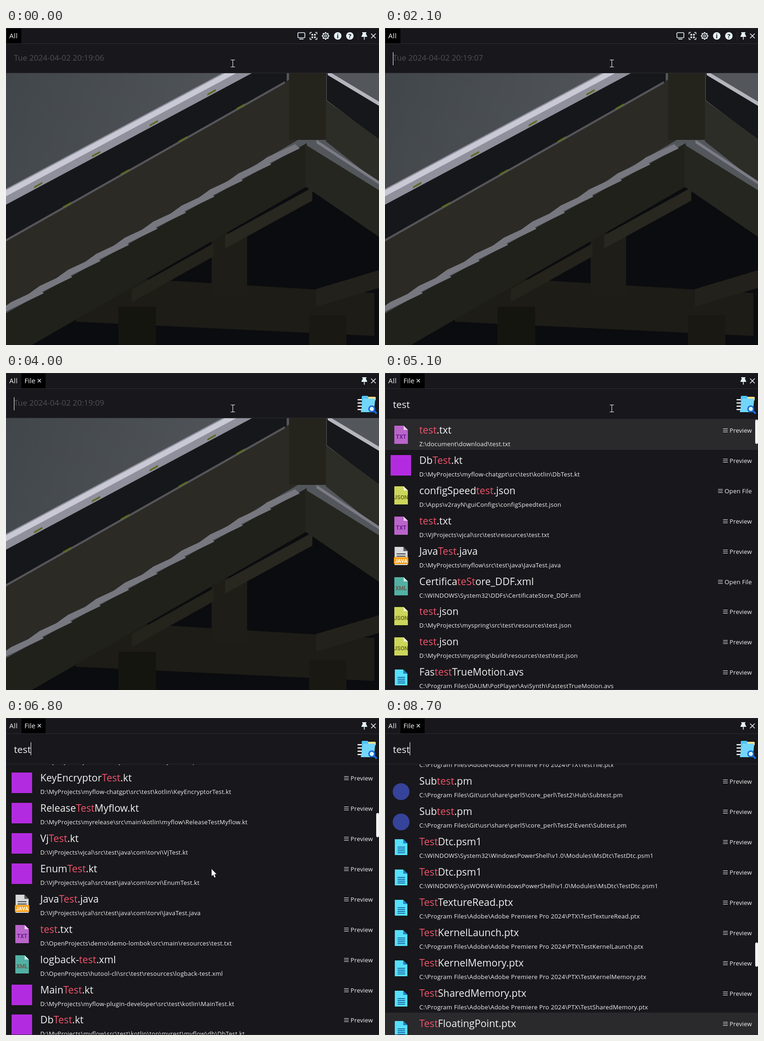
An HTML page with a canvas for the animation above (9000 ms loop, 800x680 px).

```html
<!DOCTYPE html>
<html lang="en">
<head>
<meta charset="utf-8">
<title>Launcher search</title>
<style>
html, body { margin: 0; width: 100%; height: 100%; overflow: hidden; background: #000; }
canvas { display: block; }
</style>
</head>
<body>
<canvas id="stage" width="800" height="680"></canvas>
<script>
const c = document.getElementById('stage').getContext('2d');
const LOOP = 9000, STEP = 100, BLINK = 500, PITCH = 64.9, TOP = 99;
const BG = '#18171b', EDGE = '#2d2c30', ROW = '#2a292c', INK = '#f2f2f3', HIT = '#f0546c', TOOL = '#e6f3fa';
const SANS = '"Open Sans", "Noto Sans", sans-serif', LABEL = 'Roboto, sans-serif';

// ---- drawing helpers ----
function poly(color, ...pts) {
  c.beginPath();
  for (let i = 0; i < pts.length; i += 2) c.lineTo(pts[i], pts[i + 1]);
  c.fillStyle = color;
  c.fill();
}
function line(width, x0, y0, x1, y1, color = TOOL) {
  c.beginPath(); c.moveTo(x0, y0); c.lineTo(x1, y1);
  c.strokeStyle = color; c.lineWidth = width; c.stroke();
}
function rect(color, x, y, w, h, r = 0) {
  c.beginPath(); c.roundRect(x, y, w, h, r); c.fillStyle = color; c.fill();
}
function disc(color, x, y, r) {
  c.beginPath(); c.arc(x, y, r, 0, 7); c.fillStyle = color; c.fill();
}
function ring(color, width, x, y, r) {
  c.beginPath(); c.arc(x, y, r, 0, 7); c.strokeStyle = color; c.lineWidth = width; c.stroke();
}
function cross(x, y, r, width) {
  line(width, x - r, y - r, x + r, y + r);
  line(width, x - r, y + r, x + r, y - r);
}
function text(s, x, y, size, color = INK, { gap = 0, align = 'left', font = SANS, weight = 400 } = {}) {
  c.font = `${weight} ${size}px ${font}`;
  c.letterSpacing = gap + 'px';
  c.textAlign = align;
  c.fillStyle = color;
  c.fillText(s, x, y);
  return c.measureText(s).width;
}
const progress = (t, from, to) => Math.min(1, Math.max(0, (t - from) / (to - from)));

// ---- result lists: "folder > title", matches between bars ----
const API = String.raw`D:\VjProjects\vjcal\src\test\java\com\torvi`;
const PTX = String.raw`C:\Program Files\Adobe\Adobe Premiere Pro 2024\PTX`;
const files = [];
function addFiles(start, list) {
  list.trim().split('\n').forEach((s, i) => {
    const [dir, title] = s.split(' > ');
    const name = title.replaceAll('|', '');
    files[start + i] = {
      title, sub: dir + '\\' + name, icon: name.split('.').pop(),
      tag: /config|Certif/.test(name) ? 'Open File' : 'Preview'
    };
  });
}
'Login Cache Token Media Search Price Image Video Label Upload Report Refund Audit Batch Filter'.split(' ')
  .forEach((word, i) => {
    addFiles(9 + i, `${API}\\vjstudio\\api > ${word}|Test|.kt`);
    addFiles(27 + i, `${API}\\vjmusic\\api > Pc${word}|Test|.kt`);
    addFiles(50 + i, `${PTX} > |Test|${word}.ptx`);
  });
addFiles(0, String.raw`
Z:\document\download > |test|.txt
D:\MyProjects\myflow-chatgpt\src\test\kotlin > Db|Test|.kt
D:\Apps\v2rayN\guiConfigs > configSpeed|test|.json
D:\VjProjects\vjcal\src\test\resources > |test|.txt
D:\MyProjects\myflow\src\test\java > Java|Test|.java
C:\WINDOWS\System32\DDFs > Certifica|teSt|ore_DDF.xml
D:\MyProjects\myspring\src\test\resources > |test|.json
D:\MyProjects\myspring\build\resources\test > |test|.json
C:\Program Files\DAUM\PotPlayer\AviSynth > Fas|test|TrueMotion.avs`);
addFiles(18, String.raw`
D:\MyProjects\myflow-chatgpt\src\test\kotlin > KeyEncryptor|Test|.kt
D:\MyProjects\myrelease\src\main\kotlin\myflow > Release|Test|Myflow.kt
${API} > Vj|Test|.kt
${API} > Enum|Test|.kt
${API} > Java|Test|.java
D:\OpenProjects\demo\demo-lombok\src\main\resources > |test|.txt
D:\OpenProjects\hutool-cli\src\test\resources > logback-|test|.xml
D:\MyProjects\myflow-plugin-developer\src\test\kotlin > Main|Test|.kt
D:\MyProjects\myflow\src\test\kotlin\top\myrest\myflow\db > Db|Test|.kt`);
addFiles(40, String.raw`
${API}\vjstudio\api > PcPay|Test|.kt
${API}\vjdrmc\api > ApiZebra|Test|.kt
${API}\vjmusic\api > ApiAuth|Test|.kt
${API}\vjstudio\api > PcCase|Test|.kt
${API}\vjstudio\api > PcIpos|Test|.kt
${API}\vjstudio\api > PcUser|Test|.kt
D:\VjProjects\vjmq\src\test\java\com\torvi\vjmq\test > RocketMq|Test|.java
${API}\vjmusic\api > ApiMusic|Test|.kt
${API}\vjstudio\api > PcOrder|Test|.kt
${API}\vjstudio\api > PcMobile|Test|.kt`);
addFiles(65, String.raw`
${PTX} > |Test|Tile.ptx
C:\Program Files\Git\usr\share\perl5\core_perl\Test2\Hub > Sub|test|.pm
C:\Program Files\Git\usr\share\perl5\core_perl\Test2\Event > Sub|test|.pm
C:\WINDOWS\System32\WindowsPowerShell\v1.0\Modules\MsDtc > |Test|Dtc.psm1
C:\WINDOWS\SysWOW64\WindowsPowerShell\v1.0\Modules\MsDtc > |Test|Dtc.psm1
${PTX} > |Test|TextureRead.ptx
${PTX} > |Test|KernelLaunch.ptx
${PTX} > |Test|KernelMemory.ptx
${PTX} > |Test|SharedMemory.ptx
${PTX} > |Test|FloatingPoint.ptx`);

const pins = [
  { icon: 'pinyin', title: '|p|inyin', sub: 'pinyin' },
  { icon: 'office', title: 'K|P|Z Office', sub: String.raw`C:\Users\kelno\Desktop\WPS Office.lnk`, tag: 'Open File' },
  { icon: 'image', title: '|p|df2image', sub: 'PDF To Image' },
  { icon: 'history', title: '|p|lugin set', sub: 'From History', tag: 'Pick' },
  { icon: 'bot', title: '|p|in', sub: 'Pin Keyword //', tag: 'Default Operation' }
];

// ---- icons, relative to the top of a row and centred on MID ----
const MID = 34.5;
function sheet(color, fold, w, h, y, corner = 9) {
  const x = MID - w / 2, r = x + w;
  poly(color, x, y, r - corner, y, r, y + corner, r, y + h, x, y + h);
  poly(fold, r - corner, y, r, y + corner, r - corner, y + corner);
}
function stamp(s, y, size, color, font = LABEL) {
  text(s, MID, y, size, color, { align: 'center', weight: 700, font });
}
function labelled(color, fold, label, ink) {
  sheet(color, fold, 29, 39, 14);
  stamp(label, 42, 12, ink);
}
function stripes(color, x, y, w, h, gap, count) {
  for (let i = 0; i < count; i++) rect(color, x, y + i * gap, w, h);
}
const icons = {
  kt: () => rect('#b32be0', 12, 12, 44, 44),
  pm: () => disc('#36439a', MID, 46, 18),
  txt: () => labelled('#b965ca', '#ead3ef', 'TXT', '#6a1b90'),
  json: () => labelled('#cdd65b', '#f3f5d8', 'JSON', '#6f7420'),
  xml: () => labelled('#52b1a4', '#d4eeea', 'XML', '#6b5a50'),
  java() {
    sheet('#d8d8da', '#54585e', 28, 39, 14);
    stripes('#40454c', 25, 28, 19, 2, 5, 2);
    rect('#f9a11b', 19, 36, 31, 15, 2);
    stamp('JAVA', 47.5, 11, '#fff');
  },
  other() {
    sheet('#56e0fc', '#2480d0', 27, 34, 18);
    stripes('#1a5f9c', 27, 34, 16, 1.8, 4, 4);
  },
  pinyin() {
    rect('#5aa83a', 13, 12, 43, 43, 4);
    stamp('PY', 44, 26, '#fff', SANS);
  },
  office: () => rect('#e23c50', 18, 18, 33, 33),
  image() {
    disc('#eebd3c', MID, 33, 21.5);
    sheet('#fff', '#d8e6ea', 19, 27, 20, 6);
    rect('#7cc8e8', 27, 33, 15, 11);
    poly('#3e9d5c', 27, 44, 33, 36, 42, 44);
  },
  history() {
    rect('#3f9df5', 22, 16, 29, 32, 2);
    stripes('#b9e0ff', 25, 22, 22, 3, 6, 4);
    rect('#6cc3fb', 19, 43, 27, 10, 5);
    poly('#f4c089', 44, 37, 55, 37, 45, 53, 55, 53);
    stripes('#a8623a', 42, 35, 15, 2.5, 17, 2);
  },
  bot: () => disc('#2583e8', MID, 33.5, 21.5)
};

function drawRow(row, y, active) {
  c.save();
  c.translate(0, Math.round(y));
  if (active) rect(ROW, 1, 0, 799, 66);
  (icons[row.icon] || icons.other)();
  let x = 73.5;
  row.title.split('|').forEach((s, i) => {
    if (s) x += text(s, x, 31, 21.3, i % 2 ? HIT : INK);
  });
  text(row.sub, 73.5, 57.5, 13, INK, { gap: .22 });
  if (row.tag) {
    const w = text(row.tag, 787, 28.5, 13, INK, { gap: .15, align: 'right' });
    stripes(INK, 787 - w - 14, 20, 10, 1, 3.5, 3);
  }
  c.restore();
}

// ---- backdrop: a gabled roof in flat tones ----
// A sloping board from x0 to x1, starting at height y
function board(color, x0, x1, y, slope, h0, h1 = h0) {
  const end = y + (x1 - x0) * slope;
  poly(color, x0, y, x1, end, x1, end + h1, x0, y + h0);
}
function backdrop() {
  const fog = c.createLinearGradient(0, 97, 500, 300);
  fog.addColorStop(0, '#41464a');
  fog.addColorStop(1, '#53575c');
  rect(fog, 0, 97, 800, 583);
  // timber frame under the eaves
  board('#0b0c0f', 0, 645, 640, -.566, 500);
  board('#0b0c0f', 645, 800, 275, .62, 500);
  board('#1d1c17', 150, 790, 530, .06, 100, 92);
  board('#22211b', 665, 800, 560, -.3, 38);
  rect('#15150f', 241, 598, 81, 82);
  rect('#191812', 650, 616, 80, 64);
  rect('#1e1d17', 441, 440, 76, 137);
  board('#24231c', 270, 445, 560, -.56, 28);
  board('#282720', 470, 657, 445, -.55, 28);
  // left slope
  board('#2c2a25', 0, 625, 455, -.567, 150, 140);
  board('#20211b', 0, 645, 612, -.566, 100, 93);
  board('#16171a', 0, 602, 365, -.54, 90, 74);
  board('#55555a', 0, 598, 453, -.567, 5);
  board('#8f909b', 0, 560, 345, -.535, 34);
  board('#c9c9d6', 0, 560, 348, -.535, 13);
  // right slope and corner post
  rect('#24241d', 607, 97, 80, 143);
  board('#16171a', 688, 800, 97, .58, 58, 78);
  board('#b4b5bd', 690, 800, 92, .6, 9);
  board('#2d2d27', 686, 800, 155, .73, 88, 95);
  board('#25261f', 642, 800, 250, .62, 90, 100);
  board('#7c7c86', 666, 800, 240, .66, 7);
  // overlapping slates, then moss
  for (let x = -14; x < 580; x += 61) {
    const y = 598 - x * .566;
    poly('#777780', x, y, x + 25, y - 18, x + 85, y - 46, x + 95, y - 37, x + 10, y + 4);
  }
  for (let i = 0; i < 8; i++) {
    const x = 60 + i * 62, y = i % 2 ? 452 - x * .567 : 372 - x * .535;
    board('#5a6a24', x, x + 18, y, -.55, 4);
  }
}

// ---- window header ----
function pinAndClose() {
  rect(TOOL, 764, 9, 9, 2);
  poly(TOOL, 766, 10, 771, 10, 775, 19, 762, 19);
  line(1.6, 768.5, 18, 768.5, 25);
  cross(788, 17, 5, 1.6);
}
function toolbar() {
  c.beginPath(); c.roundRect(626, 10, 15, 11, 2);
  c.strokeStyle = TOOL; c.lineWidth = 1.6; c.stroke();
  rect(TOOL, 629, 23, 9, 1.6);
  for (const sx of [-1, 1]) for (const sy of [-1, 1]) {
    const x = 659.5 + sx * 7.5, y = 17 + sy * 7.5;
    line(1.5, x, y, x - sx * 4, y);
    line(1.5, x, y, x, y - sy * 4);
    rect(TOOL, 658 + sx * 2.8, 15.5 + sy * 2.8, 3.5, 3.5);
  }
  ring(TOOL, 1.6, 685.5, 17, 5.8);
  ring(TOOL, 1.4, 685.5, 17, 2.3);
  for (let a = 0; a < 8; a++) {
    const x = Math.cos(a * Math.PI / 4), y = Math.sin(a * Math.PI / 4);
    line(3, 685.5 + x * 5.5, 17 + y * 5.5, 685.5 + x * 8, 17 + y * 8);
  }
  for (const [x, s] of [[711.5, 'i'], [737.5, '?']]) {
    disc(TOOL, x, 17, 8);
    text(s, x, 22, 13, BG, { align: 'center', weight: 700 });
  }
  rect(EDGE, 755, 8, 1, 18);
}
function pluginIcon() {
  stripes('#fff', 754, 56, 12, 2.5, 7, 4);
  rect('#ffe08a', 776, 51, 17, 8, 2);
  rect('#4fc3f7', 763, 49, 14, 30, 2);
  poly('#72d6fb', 766, 55, 792, 55, 789, 84, 761, 84);
  line(4, 787, 79, 795, 87, '#1268d8');
  disc('#1268d8', 784.5, 77, 7.5);
  disc('#d9f2ff', 784.5, 77, 4.5);
}

// ---- timeline ----
const words = [
  { text: 'test', from: 700, to: 2100 },
  { text: 'pin', from: 2900, to: 3800 },
  { text: 'test', from: 4400, to: LOOP }
];
// Each word is typed in three steps; the caret blinks from the last key press
function input(t) {
  const word = words.findLast(w => t >= w.from);
  if (!word) return { query: '', idle: t + BLINK };
  if (t >= word.to) return { query: '', idle: Math.max(0, t - word.to - STEP) };
  const typed = Math.min(3, (t - word.from) / STEP + 1);
  return {
    query: word.text.slice(0, Math.ceil(typed * word.text.length / 3)),
    idle: Math.max(0, t - word.from - 2 * STEP)
  };
}
function scrollAt(t) {
  const d = t - 6800;
  return t < 6000 ? 0 : Math.max(0, 1162 + 1.5952 * d + 2.137e-5 * d * d);
}
function mouseAt(t) {
  const enter = progress(t, 5800, 6400), drift = progress(t, 6800, 7700), leave = progress(t, 8000, 8600);
  return { x: 486 - 45 * enter - 6 * drift, y: 76 + 248 * enter + 27 * drift + 349 * leave };
}

function pointer({ x, y }) {
  c.save();
  c.translate(Math.round(x), Math.round(y));
  if (y < TOP) {
    rect('#fff', 0, -7, 1, 14);
    for (const end of [-8, 7]) rect('#fff', -4, end, 9, 1);
  } else {
    poly('#fff', 0, 0, 0, 15, 3.5, 12, 6, 18, 8.5, 17, 6, 11, 10.5, 11);
  }
  c.restore();
}

function results(t, bottom, fileTab, pinList) {
  const scroll = scrollAt(t);
  const hovered = Math.floor((Math.min(mouseAt(t).y, 670) - TOP + scroll) / PITCH);
  const active = t < 7400 ? 0 : hovered;
  const rows = pinList ? pins : t < 1100 ? files.slice(1) : files;
  c.save();
  c.beginPath(); c.rect(0, TOP, 800, bottom - TOP); c.clip();
  rows.forEach((row, i) => {
    const y = TOP + i * PITCH - scroll;
    if (y > TOP - 70 && y < bottom) drawRow(row, y, i === active);
  });
  c.restore();
  if (fileTab) rect('#f4f4f4', 794, 100 + scroll / (PITCH * 100) * 580, 6, 52, 3);
}

function draw(t) {
  const { query, idle } = input(t);
  const fileTab = t >= 4000, pinList = query[0] === 'p';
  const bottom = !query ? 97 : fileTab ? 680 : pinList ? 421 : 594;
  rect('#000', 0, 0, 800, 680);
  if (!pinList && bottom < 680) backdrop();
  rect(BG, 0, 0, 800, bottom);
  if (query) results(t, bottom, fileTab, pinList);

  for (const y of [0, 33, query ? 98.5 : 96, bottom - 1]) rect(EDGE, 0, y, 800, 1);
  rect(EDGE, 0, 0, 1, bottom);
  rect('#000', fileTab ? 33 : 1, 1, fileTab ? 52 : 32, 32);
  text('All', 7, 22, 15, INK, { gap: .3 });
  if (fileTab) {
    text('File', 39.5, 22, 15);
    cross(71.5, 16.5, 3.5, 1.2);
    pluginIcon();
  } else toolbar();
  pinAndClose();

  let caret = 17;
  if (query) caret += text(query, 17, 75, 20.8);
  else {
    const sec = t < 200 ? '06' : t < 2200 ? '07' : '09';
    text('Tue 2024-04-02 20:19:' + sec, 17, 70, 17, '#505053');
  }
  if (Math.floor(idle / BLINK) % 2 === 0) rect('#fff', Math.round(caret), 52, 1, 28);
  pointer(mouseAt(t));
}

const start = performance.now();
function tick() {
  const t = (performance.now() - start) % LOOP;
  draw(Math.floor(t / STEP) * STEP);
  requestAnimationFrame(tick);
}
tick();
</script>
</body>
</html>
```
